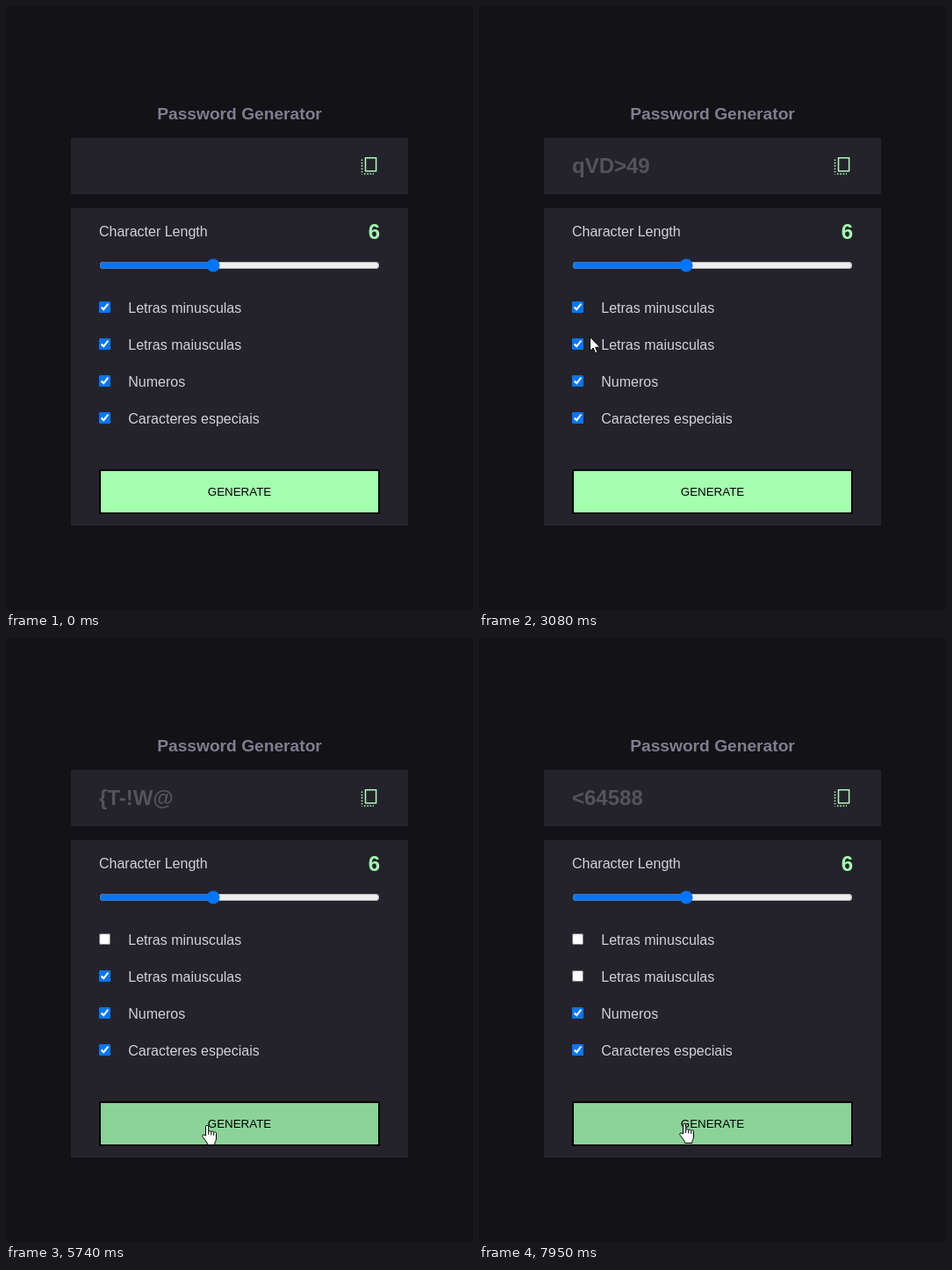
Write an HTML page that moves like this. It is 532 px wide and 687 px high and loops after 8000 ms.

```html
<!DOCTYPE html>
<html lang="en">
<head>
<meta charset="utf-8">
<title>Password Generator</title>
<style>
  html, body { margin: 0; width: 100%; height: 100%; overflow: hidden; background: #131217; }
  svg, input { position: absolute; margin: 0; pointer-events: none; }
  svg { left: 0; top: 0; }
  text { font: 16px "Liberation Sans", Arial, sans-serif; fill: #d2d1d8; white-space: pre; }
  .title { font-size: 19.2px; font-weight: bold; fill: #817d8f; }
  .pass { font-size: 24px; font-weight: bold; fill: #54535b; }
  .count { font-size: 24px; font-weight: bold; fill: #a4ffaf; }
  .cta { font-size: 13.333px; fill: #000; }
  .panel { fill: #24232b; }
  .button { fill: #a4ffaf; stroke: #000; stroke-width: 2; }
  .button.hover { fill: #8bd398; }
  .icon { fill: none; stroke: #b4f8be; stroke-width: 1.5; }
  .pointer path { fill: #fff; stroke: #000; stroke-linejoin: round; }
  input[type=range] { left: 106px; top: 287px; width: 320px; height: 16px; }
  input[type=checkbox] { left: 106px; width: 13px; height: 13px; }
  input.hover { accent-color: #005cc8; }
</style>
</head>
<body>
<svg id="page" width="532" height="687">
  <rect class="panel" x="74" y="150" width="384" height="64"/>
  <rect class="panel" x="74" y="230" width="384" height="361"/>
  <text class="title" x="266" y="129" text-anchor="middle">Password Generator</text>
  <text class="pass" id="pass" x="106" y="190"></text>
  <g class="icon">
    <path d="M409.5 172.7H421.6V187.8H409.5Z"/>
    <path d="M405.5 174.5V191.5M408 191H419" stroke-dasharray="1.6 1.7"/>
  </g>
  <text x="106" y="262">Character Length</text>
  <text class="count" x="426" y="265" text-anchor="end">6</text>
  <rect class="button" id="button" x="107" y="528" width="318" height="49"/>
  <text class="cta" x="266" y="557" text-anchor="middle">GENERATE</text>
</svg>
<input type="range" min="0" max="15" value="6" tabindex="-1">
<svg class="pointer" width="532" height="687">
  <path id="arrow" d="M.5 .5V16.6L4.2 13.1 6.6 18.7 9 17.7 6.6 12.2H11.8Z"/>
  <g id="hand">
    <path d="M-1.5 12V1.9a1.6 1.6 0 0 1 3.2 0V7.6a1.6 1.6 0 0 1 3 .4a1.6 1.6 0 0 1 3 .7a1.5 1.5 0 0 1 2.8 1V15c0 3.2-1.8 4-1.8 7.5H.8C.4 19.5-2.6 17-4.9 13.4c-1.2-1.9.7-3.2 2.1-1.9Z"/>
    <path d="M1.7 7.6V11M4.7 8V11.5M7.7 8.7V12"/>
  </g>
</svg>
<script>
  const LOOP = 8000, STEP = 66.7;
  const $ = id => document.getElementById(id);

  const labels = ["Letras minusculas", "Letras maiusculas", "Numeros", "Caracteres especiais"];
  const boxes = labels.map((label, i) => {
    const text = document.createElementNS("http://www.w3.org/2000/svg", "text");
    text.setAttribute("x", 139.3);
    text.setAttribute("y", 349 + 42 * i);
    text.textContent = label;
    $("page").append(text);
    const box = document.createElement("input");
    box.type = "checkbox";
    box.tabIndex = -1;
    box.style.top = 336 + 42 * i + "px";
    document.querySelector(".pointer").before(box);
    return box;
  });

  // Pointer path: step, x, y
  const path = [
    [2, 15, 672], [5, 125, 614], [7, 191, 562], [9, 214, 508], [11, 220, 544], [13, 221, 550],
    [15, 226, 548], [19, 230, 543], [22, 232, 543], [35, 232, 543],
    [36, 230, 538], [38, 218, 503], [42, 158, 418], [46, 126, 376], [47, 130, 368],
    [52, 145, 350], [61, 145, 350], [66, 146, 344], [70, 146, 344],
    [71, 150, 333], [73, 188, 455], [75, 229, 551], [77, 229, 554], [93, 229, 554],
    [94, 214, 522], [95, 191, 486], [98, 158, 398], [100, 149, 350], [103, 151, 380], [108, 153, 385],
    [109, 153, 385], [112, 208, 518], [114, 234, 554], [117, 234, 554], [118, 234, 552]
  ];

  // Generated passwords and unchecked boxes, by step
  const passwords = [[0, ""], [28, "qVD>49"], [83, "{T-!W@"], [118, "<64588"]];
  const uncheckAt = [70, 109, Infinity, Infinity];

  function pointerAt(k) {
    const next = path.findIndex(p => p[0] > k);
    if (next < 0) return path[path.length - 1].slice(1);
    const [k0, x0, y0] = path[next - 1], [k1, x1, y1] = path[next];
    const f = (k - k0) / (k1 - k0);
    return [Math.round(x0 + (x1 - x0) * f), Math.round(y0 + (y1 - y0) * f)];
  }

  function place(el, on, x, y) {
    el.style.display = on ? "" : "none";
    el.setAttribute("transform", `translate(${x} ${y})`);
  }

  function draw(t) {
    const k = Math.floor((t + 12) / STEP);
    const shown = k >= path[0][0];
    const [x, y] = shown ? pointerAt(k) : [-50, -50];
    const onButton = x >= 106 && x < 426 && y >= 527 && y < 578;
    place($("arrow"), shown && !onButton, x, y);
    place($("hand"), shown && onButton, x, y);
    $("button").classList.toggle("hover", onButton);
    $("pass").textContent = passwords.filter(p => p[0] <= k).pop()[1];
    boxes.forEach((box, i) => {
      const top = 334 + 42 * i;
      box.checked = k < uncheckAt[i];
      box.classList.toggle("hover", x >= 139 && x < 290 && y >= top && y < top + 19);
    });
  }

  const start = performance.now();
  function tick() {
    draw((performance.now() - start) % LOOP);
    requestAnimationFrame(tick);
  }
  tick();
</script>
</body>
</html>
```
